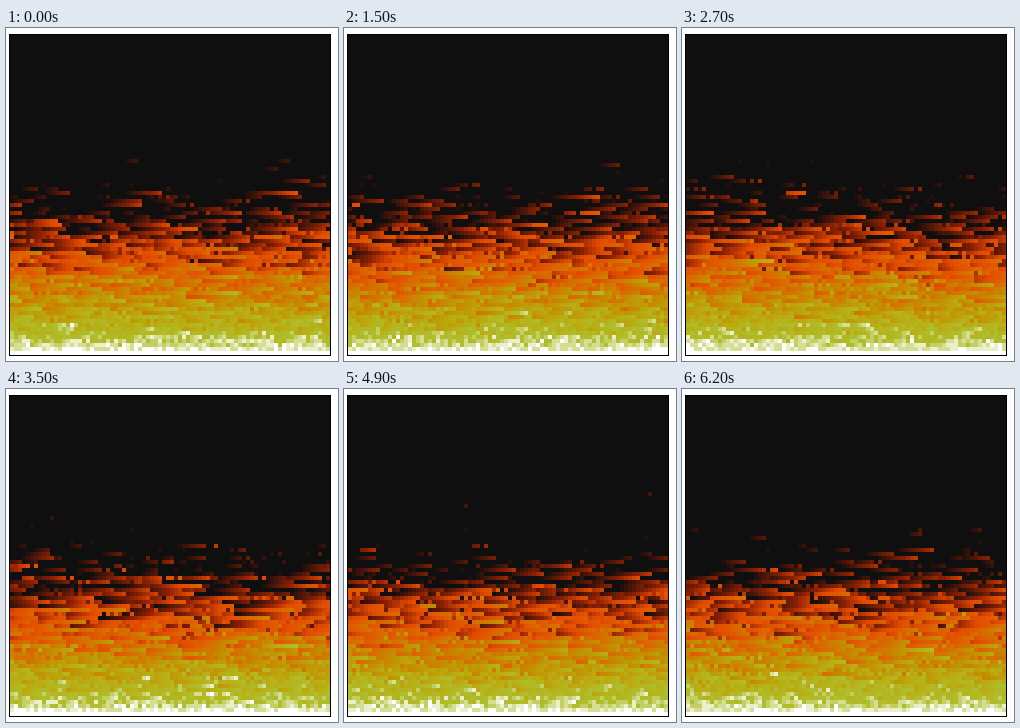
Recreate the animation shown at these times as an HTML page with a canvas. Size 332 by 333 pixels, loop 6.3 s.

```html
<!DOCTYPE html>
<html lang="en">
<head>
<meta charset="utf-8">
<title>Pixel fire</title>
<style>
  html, body { margin: 0; width: 100%; height: 100%; overflow: hidden; background: #fff; }
  canvas { display: block; }
</style>
</head>
<body>
<canvas id="stage" width="332" height="333"></canvas>
<script>
const SIZE = 80, CELL = 4, LEFT = 4, TOP = 7, MAX_HEAT = 36;
const TICK = 100, SLOTS = 63, STEPS_PER_TICK = 2, WARM_UP = 240;
// Ticks at which the picture stands still
const PAUSES = [1, 5, 6, 10, 11, 30, 38, 43, 44, 45, 47];

const ctx = document.getElementById('stage').getContext('2d');

// Key colours from cold to white-hot; the browser's gradient blends between them
function makePalette() {
  const ramp = new OffscreenCanvas(MAX_HEAT + 1, 1).getContext('2d');
  const gradient = ramp.createLinearGradient(0.5, 0, MAX_HEAT + 0.5, 0);
  const keys = { 0: '#0f0f0f', 1: '#240f0c', 7: '#8a2003', 12: '#e04a00', 15: '#e25800',
                 23: '#c29200', 28: '#b8ae14', 32: '#aebe2c', 36: '#fff' };
  for (const heat in keys) gradient.addColorStop(heat / MAX_HEAT, keys[heat]);
  ramp.fillStyle = gradient;
  ramp.fillRect(0, 0, MAX_HEAT + 1, 1);
  const data = ramp.getImageData(0, 0, MAX_HEAT + 1, 1).data;
  return Array.from({ length: MAX_HEAT + 1 }, (_, i) => `rgb(${data.slice(i * 4, i * 4 + 3)})`);
}
const palette = makePalette();

let seed = 1993;
function random() {
  seed = (seed + 0x6D2B79F5) | 0;
  let t = Math.imul(seed ^ (seed >>> 15), 1 | seed);
  t = (t + Math.imul(t ^ (t >>> 7), 61 | t)) ^ t;
  return ((t ^ (t >>> 14)) >>> 0) / 4294967296;
}

const fire = new Uint8Array(SIZE * SIZE);
fire.fill(MAX_HEAT, SIZE * (SIZE - 1));

// Heat rises one row, cools by 0 to 2 and drifts left by the same amount
function spread() {
  for (let y = 0; y < SIZE - 1; y++) {
    for (let x = 0; x < SIZE; x++) {
      const decay = Math.floor(random() * 3);
      const below = fire[(y + 1) * SIZE + (x + decay) % SIZE];
      fire[y * SIZE + x] = Math.max(0, below - decay);
    }
  }
}

function run(steps) {
  while (steps-- > 0) spread();
}

run(WARM_UP);
const pictures = Array.from({ length: SLOTS }, (_, slot) => {
  if (!PAUSES.includes(slot)) run(STEPS_PER_TICK);
  return fire.slice();
});

function draw(picture) {
  picture.forEach((heat, i) => {
    ctx.fillStyle = palette[heat];
    ctx.fillRect(LEFT + i % SIZE * CELL, TOP + Math.floor(i / SIZE) * CELL, CELL, CELL);
  });
}

ctx.fillRect(LEFT - 1, TOP - 1, SIZE * CELL + 2, SIZE * CELL + 2);

let shown = -1;
const start = performance.now();
function frame() {
  const slot = Math.floor((performance.now() - start) / TICK) % SLOTS;
  if (slot !== shown) draw(pictures[shown = slot]);
  requestAnimationFrame(frame);
}
frame();
</script>
</body>
</html>
```
